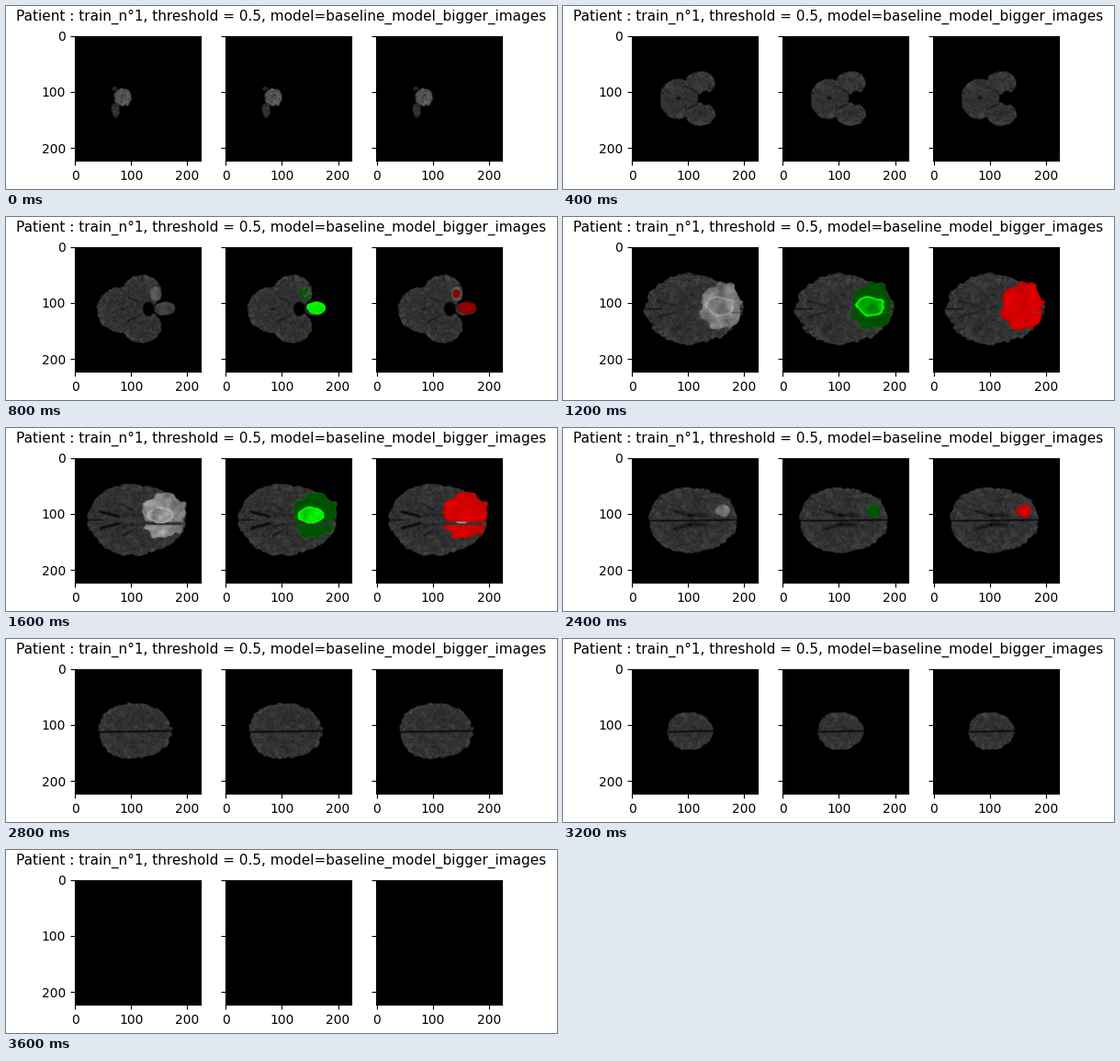
These frames come from a looping animation (600x200 px, 4 s). A matplotlib script:

```python
import numpy as np
import matplotlib.pyplot as plt
from matplotlib.animation import FuncAnimation

N = 224            # image cells per side
SIDE = 136.76      # panel side in screen pixels
FRAMES = 20
BLANK = 18         # first empty slice
MID = 101          # height of the brain's midline

axis = (np.arange(N) + 0.5) * SIDE / N
U, V = np.meshgrid(axis, axis + 32.6)
freq = np.fft.fftfreq(N)
K2 = freq[:, None] ** 2 + freq[None, :] ** 2

# Key slice: centre x, y, radii x, y, and depth of the four lobes
EDEMA = {4: (87, 84.5, 7, 8.5, 0), 6: (97, 98, 22, 25.5, -0.05),
         8: (97, 95, 23, 25, 0), 10: (97, 91, 18, 14.5, 0.14),
         13: (100, 91, 3, 3, 0)}
CORE = {4: (98, 100, 10, 7, 0), 6: (96, 98, 15, 11, 0),
        8: (93.5, 96, 14.5, 8.5, 0), 10: (95, 97, 3, 2, 0)}


def blur(a, s):
    return np.fft.ifft2(np.fft.fft2(a) * np.exp(-2 * (np.pi * s) ** 2 * K2)).real


def soften(mask, s):
    return np.clip(blur(mask * 1.0, s), 0, 1)


def noise(seed, s):
    a = blur(np.random.default_rng(seed).normal(size=(N, N)), s)
    return a / a.std()


def oval(x, y, rx, ry, p=2.0):
    return np.abs((U - x) / rx) ** p + np.abs((V - y) / ry) ** p


def line(x0, y0, x1, y1, w):
    dx, dy = x1 - x0, y1 - y0
    t = np.clip(((U - x0) * dx + (V - y0) * dy) / (dx * dx + dy * dy), 0, 1)
    d2 = (U - x0 - t * dx) ** 2 + (V - y0 - t * dy) ** 2
    return np.exp(-d2 / w ** 2)


def twin(x0, d0, x1, d1, w):
    """The same stroke above and below the midline."""
    return line(x0, MID - d0, x1, MID - d1, w) + line(x0, MID + d0, x1, MID + d1, w)


def patch(keys, i, seed, grow=1.0, rough=0.07):
    ks = sorted(keys)
    x, y, rx, ry, lobe = (np.interp(i, ks, col) for col in zip(*(keys[k] for k in ks)))
    angle = np.arctan2(V - y, U - x)
    edge = 1 + lobe * np.cos(4 * angle) + rough * noise(seed, 4)
    return np.sqrt(oval(x, y, rx, ry)) < grow * edge


def extent(i):
    """Left, right and half height of a slice through the dome of the brain."""
    dome = np.sqrt(1 - (abs(i - 7) / 10.3) ** 2.4)
    return 60 - 46 * dome ** 1.2, 60 + 61 * dome ** 1.2, 39 * dome


def brain_mask(i):
    wob = 0.035 * noise(i + 300, 2.5)
    if i >= 5:
        left, right, ry = extent(i)
        cx = left + 0.43 * (right - left)
        rx = np.where(U < cx, cx - left, right - cx)
        return oval(cx, MID, rx, ry, np.interp(i, [6, 10], [1.8, 2.1])) + wob < 1
    # Low slices: cerebellum, two temporal lobes, then the parts between them
    k = (i - 1) / 3
    mask = oval(51, 102, 18 + 9 * k, 20 + 5 * k) + wob < 1
    for y in (86 - 4 * k, 118 + 2 * k):
        mask |= oval(75 - 2 * k, y, 14 + 7 * k, 10 + 8 * k) + wob < 1
    if i >= 3:
        mask |= oval(64, MID, 20, 26) + wob < 1
    if i == 4:
        mask |= oval(97, MID, 12, 7) + 3 * wob < 1
    return mask


def dark_parts(i):
    if i < 6:
        hole = 1 / (1 + np.exp(12 * (oval(80, MID, 6, 8) - 1)))
        spot = line(50, MID, 53, MID, 1.2)
        d = hole + 0.7 * spot + 0.45 * twin(58, 13, 70, 7, 1)
    else:
        left, right, _ = extent(i)
        base = np.clip(1 - abs(i - 8) / 3, 0, 0.85)
        horn = np.clip(1.15 - abs(i - 10.3) / 2.5, 0, 0.9)
        d = base * (twin(28, 9, 47, 4, 1.6) + 0.5 * twin(52, 17, 62, 11, 1.1))
        d += horn * (twin(46, 10, 63, 5, 2) + twin(63, 5, 80, 5.5, 2))
        if i < 12:
            d += 0.7 * (line(left, MID, left + 17, MID, 0.8)
                        + line(right - 14, MID + 1, right, MID, 0.8))
        else:
            d += 0.9 * line(left - 2, MID + 1, right + 2, MID, 0.9)
    return np.clip(d, 0, 1)


def first_slice():
    g = np.zeros((N, N))
    for x, y, rx, ry, level in ((52, 100, 9.5, 9.5, 0.32), (44, 114, 4.5, 8, 0.2),
                                (43, 91, 3, 2, 0.16)):
        mask = oval(x, y, rx, ry) + 0.1 * noise(x, 2) < 1
        g = np.maximum(g, level * soften(mask, 0.8))
    return g * (1 + 0.14 * noise(7, 1.2))


def tissue(i, mask):
    folds, fine = noise(i + 20, 2.4), noise(i + 60, 1.0)
    rim = np.clip(2.2 * (1 - soften(mask, 9)), 0, 1)
    g = 0.2 + 0.018 * fine + 0.014 * folds + 0.035 * rim
    g *= 1 - (0.12 + 0.4 * rim) * np.exp(-(folds / 0.22) ** 2)
    return g * (1 - dark_parts(i)) * soften(mask, 0.7)


def mix(img, mask, colour):
    m = soften(mask, 0.6)
    if img.ndim == 3:
        m = m[..., None]
    return img * (1 - m) + colour * m


def tint(level, channel):
    c = np.zeros((N, N, 3))
    c[..., channel] = level
    return c


def grey(g):
    return np.clip(np.dstack([g] * 3), 0, 1)


def panels(i):
    if i >= BLANK:
        return [np.zeros((N, N, 3))] * 3
    if i == 0:
        return [grey(first_slice())] * 3
    mask = brain_mask(i)
    if not 4 <= i <= 12:
        return [grey(tissue(i, mask))] * 3

    # Masks: swelling, its bright core, and the prediction
    fissure = line(76, 104.5, 121, 105, 0.1 + 1.6 * max(0, 1 - abs(i - 8) / 2)) > 0.4
    edema = patch(EDEMA, i, i + 100) & ~fissure
    core = patch(CORE, i, i + 220) & (i < 10)
    guess = patch(EDEMA, i, i + 100, np.interp(i, [4, 6], [0.6, 1.03])) & ~fissure
    if i < 6:
        guess = guess | core
    ring = core & (soften(core, 3) < 0.85)

    cloud, fine = noise(i + 260, 4), noise(i + 280, 1.2)
    level = np.interp(i, [4, 6, 8, 10, 12], [0.36, 0.48, 0.54, 0.55, 0.45])
    lesion = level * (0.75 + 0.25 * soften(edema, 3) + 0.09 * cloud + 0.04 * fine)
    g = mix(tissue(i, mask | edema), edema, lesion)
    if i == 4:
        g = mix(g, core, 0.28 + 0.04 * cloud)
    else:
        g = mix(g, ring, lesion + 0.12)
    scan = grey(g)

    shown = edema & (fine > -0.4) if i == 4 else edema
    heart = np.interp(i, [4, 6, 8], [0.97, 0.64, 0.86])
    truth = mix(scan, shown, tint(0.32 + 0.015 * fine, 1))
    truth = mix(truth, core, tint(heart + 0.06 * cloud, 1))
    truth = mix(truth, ring, tint(0.99, 1))

    red = np.interp(i, [4, 6], [0.6, 0.84]) * (0.55 + 0.45 * soften(guess, 2))
    found = mix(scan, guess, tint(red + 0.025 * cloud, 0))
    return [np.clip(p, 0, 1) for p in (scan, truth, found)]


slices = [panels(i) for i in range(FRAMES)]

plt.rcParams["font.family"] = "DejaVu Sans"
fig, axes = plt.subplots(1, 3, sharey=True, figsize=(6, 2), dpi=100)
fig.suptitle("Patient : train_n°1, threshold = 0.5, model=baseline_model_bigger_images",
             fontsize=11)
views = [ax.imshow(p) for ax, p in zip(axes, slices[0])]


def update(i):
    for view, p in zip(views, slices[i]):
        view.set_data(p)
    return views


anim = FuncAnimation(fig, update, frames=FRAMES, interval=200, repeat=True)
plt.show()
```
